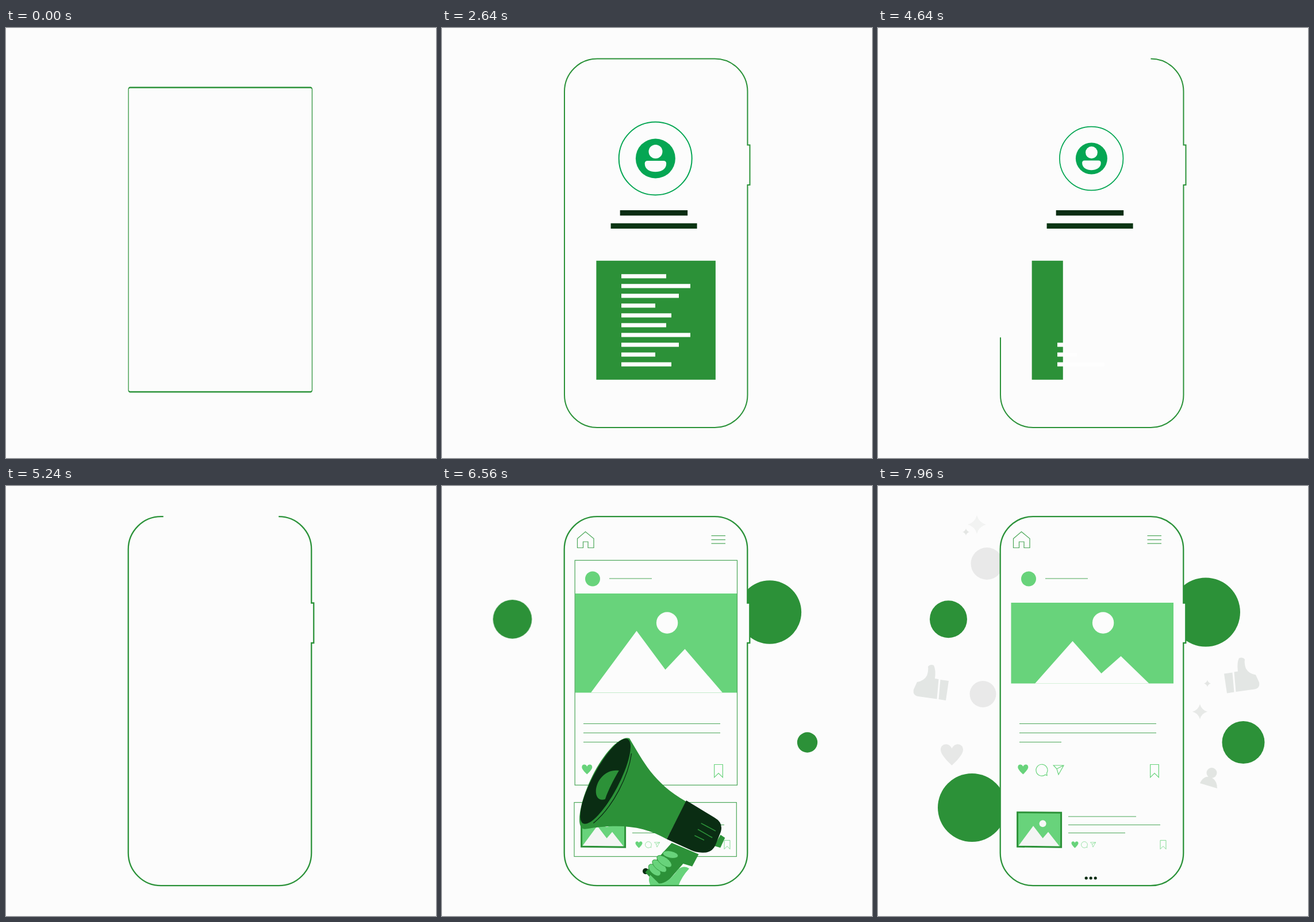
An HTML page that plays this animation: 748 by 748 pixels, repeating every 8000 ms.

```html
<!DOCTYPE html>
<html lang="en">
<head>
<meta charset="utf-8">
<title>Phone feed</title>
<style>
html, body { margin: 0; width: 100%; height: 100%; overflow: hidden; background: #fcfcfc; }
svg { display: block; width: 100vw; height: 100vh; }
.ln { fill: none; stroke: #4ba758; stroke-width: 1.2; }
.ic { fill: none; stroke: #68d37b; stroke-width: 1.2; }
.frame { fill: none; stroke: #2b9239; }
</style>
</head>
<body>
<svg id="stage" viewBox="0 0 748 748"></svg>
<script>
const BG = '#fcfcfc', GREEN = '#2c9138', LIGHT = '#68d37b', DARK = '#0a2d13', TEAL = '#05a653';
const LOOP = 8000;
const $ = id => document.getElementById(id);

const clamp = v => Math.max(0, Math.min(1, v));
const mix = (a, b, p) => a + (b - a) * p;
const inOut = p => p < .5 ? 2 * p * p : 1 - 2 * (1 - p) ** 2;
const out = p => 1 - (1 - p) ** 3;
const ramp = (t, start, dur, ease = inOut) => ease(clamp((t - start) / dur));
const back = p => 1 + 2.2 * (p - 1) ** 3 + 1.2 * (p - 1) ** 2;

// Phone outline, clockwise from the top right corner; k widens x for a later squeeze
function phonePath(l, top, r, bot, rad, btn, k = 1) {
  const x = v => (v / k).toFixed(2), a = `A${x(rad)} ${rad} 0 0 1 `;
  const side = btn > 0 ? `V203.5 H${x(r + btn)} V273 H${x(r)} ` : '';
  return `M${x(r - rad)} ${top} ${a}${x(r)} ${top + rad} ${side}V${bot - rad} ` +
    `${a}${x(r - rad)} ${bot} H${x(l + rad)} ${a}${x(l)} ${bot - rad} V${top + rad} ${a}${x(l + rad)} ${top}Z`;
}

const heart = 'M0 8.5 C-4 5-9-.5-9-4 C-9-9.5-2-10 0-5 C2-10 9-9.5 9-4 C9-.5 4 5 0 8.5Z';
const icons = {
  heart: `<path d="${heart}" fill="${LIGHT}"/>`,
  bubble: '<path class="ic" d="M6 8 A10 10 0 1 1 8.5 5.2 L9 9.3Z"/>',
  plane: '<path class="ic" d="M-8.7 -8 H9 L0 8 L-3 -2Z M-3 -2 L9 -8"/>',
  mark: '<path class="ic" d="M-7.3 -11.2 H7.3 V11.2 L0 3.8 L-7.3 11.2Z"/>'
};
const pops = [];
function pop(x, y, size, start, inner, dur = 300) {
  const id = 'pop' + pops.length;
  pops.push({ id, x, y, size, start, dur });
  return `<g id="${id}">${inner}</g>`;
}
const disc = (x, y, r, start) => pop(x, y, r, start, `<circle r="1" fill="${GREEN}"/>`, 440);

const feedLines = [
  [246, 413.5, 238, 5558, 480], [246, 429.5, 238, 5586, 480], [246, 445.5, 73, 5645, 480],
  [331, 575, 118, 5528, 480], [331, 589.5, 160, 5555, 480], [331, 603.5, 99, 5600, 480],
  [291, 161, 74, 5900, 300],
  [468.5, 86.5, 24.5, 5900, 240], [468.5, 93.5, 24.5, 5940, 240], [468.5, 100, 24.5, 5980, 240]
];
const codeWidths = [78, 120, 100, 59, 87];
const codeLines = [...Array(10).keys()];

const star = (x, y, r, fill) => {
  const q = r * .22;
  return `<path fill="${fill}" transform="translate(${x} ${y})" d="M0 ${-r} Q${q} ${-q} ${r} 0 Q${q} ${q} 0 ${r} Q${-q} ${q} ${-r} 0 Q${-q} ${-q} 0 ${-r}Z"/>`;
};
const like = `<path d="M68 341 Q80 339 85 330 Q88 322 87 314 Q91 309 97 312 Q101 320 99 335 L105.500 336 L102.500 370.500 L70 366 Q60 364 62 354Z
  M108.500 337 L123 339 L118 373 L105.500 371Z" fill="#e3e6e4"/>`;
const greys = `<circle cx="189.500" cy="135" r="28" fill="#e9e9e9"/><circle cx="182.500" cy="362" r="23" fill="#e9e9e9"/>
  ${star(172, 67, 16, '#f2f3f2')}${star(153, 80, 6, '#e4e6e4')}${star(573, 343.5, 6, '#e4e6e4')}${star(560, 392.500, 13, '#e7e9e7')}
  ${like}<g transform="matrix(-1 0 0 1 725 -12.500)">${like}</g>
  <path d="${heart}" transform="translate(128.500 467.500) scale(2.170)" fill="#e7e8e7"/>
  <g fill="#e2e5e2"><circle cx="580.500" cy="499" r="9"/><path d="M560 517 Q566 504 577 506 Q590 510 590 526Z"/></g>`;

const finger = (x, y, rx, ry, a) =>
  `<ellipse rx="${rx}" ry="${ry}" transform="translate(${x} ${y}) rotate(${a})" fill="${LIGHT}" stroke="${GREEN}" stroke-width=".8"/>`;
const megaphone = `
  <path fill="${GREEN}" d="M474 513 L482 518 L475 535.500 L464 533Z M390 532 L438 549 L428 571 L412 567 L389 597 Q378 608 366 604 L347 586Z"/>
  <path fill="${GREEN}" d="M306 355 C332 393 352 430 411 459 L381 526 C340 506 300 503 238 517 C220 519 226 470 245 425 C265 378 292 350 306 355Z"/>
  <ellipse rx="23" ry="83" transform="translate(268.500 432) rotate(24.500)" fill="${DARK}"/>
  <path fill="${GREEN}" d="M291 412 C270 410 254 428 253 448 C253 463 262 467 270 463 C275 445 283 428 291 412Z"/>
  <path fill="none" stroke="${DARK}" stroke-width="1.300" d="M311 381 C308 420 285 475 252 506"/>
  <path fill="${DARK}" d="M411 457 L462 484 Q478 492 474 508 L466 532 Q460 546 444 546 Q432 546 425 543 L381 526Z"/>
  <path fill="none" stroke="${GREEN}" stroke-width="1.600" d="M439 495 L465 507 M434 506 L460 519 M429 517 L446 524"/>
  <path fill="${LIGHT}" d="M334.500 700 L359 611 Q351 598 356 590 L372 604 Q388 603 404 577 Q414 569 423 575 Q409 592 405 610 L388 700Z"/>
  ${finger(363, 581, 13, 7, 40)}${finger(371, 573.500, 15, 7, 36)}${finger(379, 565, 15, 7, 32)}${finger(389, 552.500, 13.500, 6, 8)}
  <path fill="none" stroke="${GREEN}" d="M369 622 Q376 622 382 620"/>`;

const bodyPath = phonePath(212.7, 53.2, 531.3, 695.2, 57, 4);

$('stage').innerHTML = `
<defs>
  <clipPath id="screen"><path d="${bodyPath}"/></clipPath>
  <clipPath id="photoClip"><rect id="photoBox" x="231.500" width="282.500"/></clipPath>
</defs>
<rect width="748" height="748" fill="${BG}"/>
<g id="profile">
  <path id="phoneA" class="frame" pathLength="1"/>
  <circle id="ring" r="63.500" fill="none" stroke="${TEAL}" stroke-width="2"/>
  <circle id="disc" r="34.500" fill="${TEAL}"/>
  <g id="face" fill="${BG}"><circle cx=".3" cy="-12" r="12"/>
    <path d="M-13.500 4 H14 Q19 4 19 9 C19 19 9 23.300 0 23.300 S-18.500 19 -18.500 9 Q-18.500 4 -13.500 4Z"/></g>
  <rect id="bar0" x="309.700" y="317" height="9.300" fill="${DARK}"/>
  <rect id="bar1" x="293.600" y="339.700" height="9.300" fill="#0a3513"/>
  <rect id="panel" fill="${GREEN}"/>
  ${codeLines.map(i => `<rect id="code${i}" x="312" y="${428.2 + 17.03 * i}" height="7.200" fill="#fefefe"/>`).join('')}
</g>
<g id="feed">
  <g id="greys">${greys}</g>
  ${disc(122.5, 231.7, 32.5, 6320)}${disc(570, 219.500, 60, 6400)}${disc(635.500, 446, 37, 6500)}${disc(163.500, 559.500, 59.500, 6560)}
  <path id="fillB" d="${bodyPath}" fill="${BG}"/>
  <g clip-path="url(#photoClip)">
    <rect x="231" y="180" width="284" height="190" fill="${LIGHT}"/>
    <circle id="sun" r="18.700" fill="${BG}"/>
    <path id="hills" fill="${BG}" d="M259 0 L338.500 -107.500 L388.500 -40 L422.500 -76 L488 0Z"/>
  </g>
  <rect id="cardA" class="ln" x="231.200" y="129.300" width="282.300" height="391" pathLength="1"/>
  <rect id="cardB" class="ln" x="230" y="550.500" width="282.300" height="94" pathLength="1"/>
  ${feedLines.map((l, i) => `<path id="line${i}" class="ln"/>`).join('')}
  ${pop(249.500, 93.500, 1, 5810, '<path class="ln" d="M-14 -2 L0 -14 L14.500 -2 V14 H4.500 V3.500 H-4 V14 H-14Z"/>')}
  ${pop(262, 161.500, 13, 5860, `<circle r="1" fill="${LIGHT}"/>`)}
  ${pop(252.300, 493, 1, 5440, icons.heart)}${pop(285, 494.200, 1, 5480, icons.bubble)}
  ${pop(314, 494, 1, 5520, icons.plane)}${pop(481, 495.700, 1, 5530, icons.mark)}
  ${pop(342.500, 624, .67, 5860, icons.heart)}${pop(359, 624, .54, 5900, icons.bubble)}
  ${pop(374, 624, .52, 5940, icons.plane)}${pop(496, 624, .68, 5960, icons.mark)}
  <g id="thumb">
    <path d="M-38 -30 L38 -29.500 L38 30.500 L-38 29.500Z" fill="${LIGHT}" stroke="${GREEN}" stroke-width="3"/>
    <path d="M-36 28 L-10.500 -6.500 L6 15 L15.500 4 L35 28.800Z" fill="#f4f5f4"/><circle cx="6" cy="-10.500" r="6" fill="#f7f8f7"/>
  </g>
  <g id="dots" fill="${DARK}"><circle cx="-16" cy="-24" r="5.200"/><circle cy="-24" r="5.200"/><circle cx="16" cy="-24" r="5.200"/></g>
  <g clip-path="url(#screen)"><g id="mega">${megaphone}</g></g>
  <path id="phoneB" class="frame" d="${bodyPath}" stroke-width="2.300" pathLength="1"/>
</g>`;

function show(id, on) { $(id).style.display = on ? '' : 'none'; }
function set(id, attrs) { for (const k in attrs) $(id).setAttribute(k, attrs[k]); }
function place(id, x, y, sx, sy = sx) {
  show(id, sx > .002 && sy > .002);
  set(id, { transform: `translate(${x} ${y}) scale(${sx} ${sy})` });
}
function trim(id, p) {
  show(id, p > .001);
  set(id, { 'stroke-dasharray': p > .999 ? 'none' : `${p} 2` });
}

function drawProfile(t) {
  const grow = ramp(t, 0, 440), bend = ramp(t, 120, 600), squeeze = mix(.5, 1, ramp(t, 0, 500));
  const btn = 4 * ramp(t, 560, 260);
  set('phoneA', {
    d: phonePath(213, mix(103.5, 53.5, grow), mix(532.5, 531.5, grow), mix(633, 695, grow), mix(3, 57, bend), btn, squeeze),
    transform: `scale(${squeeze} 1)`, 'stroke-width': mix(2.5, 2, grow)
  });
  trim('phoneA', 1 - ramp(t, 4338, 680));

  place('ring', 371.2, 227, ramp(t, 480, 440) - ramp(t, 4528, 440));
  place('disc', 371.4, 227, ramp(t, 580, 440) - ramp(t, 4500, 440));
  place('face', 371.2, 227, ramp(t, 620, 440) - ramp(t, 4528, 440));
  [117.5, 150].forEach((w, i) =>
    set('bar' + i, { width: w * (ramp(t, 840 + 80 * i, 320) - ramp(t, 4650 + 60 * i, 320)) }));

  const h = ramp(t, 1056, 800), gone = ramp(t, 4180, 720), top = mix(407, 404.8, h);
  set('panel', { x: mix(268.4, 267.4, gone), y: top, width: 207.5 * (1 - gone), height: mix(0, 611.8 - top, h) });
  codeLines.forEach(i => {
    const p = ramp(t, 1320 + 98 * i, 440) - ramp(t, 3700 + 98 * i, 340);
    set('code' + i, { width: codeWidths[i % 5] * p });
  });
}

function drawFeed(t) {
  trim('phoneB', ramp(t, 4880, 470));
  show('fillB', t > 5350);
  trim('cardA', ramp(t, 5380, 420) - ramp(t, 7340, 440));
  trim('cardB', ramp(t, 5400, 420) - ramp(t, 7380, 440));

  const box = 172.5 * (ramp(t, 5580, 400) - ramp(t, 7826, 440));
  set('photoBox', { y: 273.2 - box / 2, height: box });
  const rise = ramp(t, 5610, 400);
  place('sun', 391.6, mix(332, 238, rise), rise);
  place('hills', 0, 359.5, 1, ramp(t, 5600, 400) - ramp(t, 7834, 440));

  feedLines.forEach(([x, y, w, start, dur], i) => {
    const p = ramp(t, start, dur);
    show('line' + i, p > 0);
    set('line' + i, { d: `M${x} ${y} h${w * p}` });
  });
  pops.forEach(o => place(o.id, o.x, o.y, o.size * ramp(t, o.start, o.dur, o.size > 30 ? back : inOut)));
  place('thumb', 280.6, 597.7, ramp(t, 5560, 410));
  place('dots', 370.2, 694, ramp(t, 5480, 320) - ramp(t, 7760, 400));

  const up = ramp(t, 6220, 900, out) - ramp(t, 7300, 520);
  show('mega', up > 0);
  set('mega', { transform: `translate(0 ${360 * (1 - up)}) rotate(${14 * (1 - up)} 362 696)` });
  set('greys', { opacity: ramp(t, 7040, 120) });
}

function frame(now) {
  const t = now % LOOP;
  show('profile', t < 5060);
  show('feed', t > 4860);
  if (t < 5060) drawProfile(t);
  if (t > 4860) drawFeed(t);
}
let begin;
function tick(now) {
  begin ??= now;
  frame(now - begin);
  requestAnimationFrame(tick);
}
frame(0);
requestAnimationFrame(tick);
</script>
</body>
</html>
```
